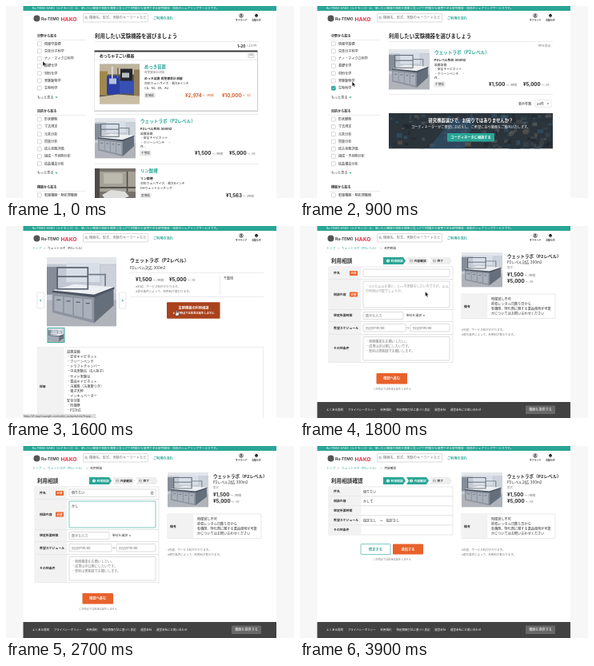
These frames come from a looping animation (360 px wide and 240 px high, 4000 ms). An HTML page with a canvas:

```html
<!DOCTYPE html>
<html lang="ja">
<head>
<meta charset="utf-8">
<style>
html, body { margin: 0; width: 100%; height: 100%; overflow: hidden; background: #fff; }
canvas { display: block; width: 360px; height: 240px; }
</style>
</head>
<body>
<canvas id="stage"></canvas>
<script>
const canvas = document.getElementById('stage');
const c = canvas.getContext('2d');
const ratio = window.devicePixelRatio || 1;
canvas.width = 360 * ratio;
canvas.height = 240 * ratio;
c.scale(ratio, ratio);

const TEAL = '#2aa596', ORANGE = '#e8622c', RED = '#d9602f', INK = '#2b2b2b', GREY = '#777', LINE = '#d9d9d9';
const WET_LAB = 'ウェットラボ（P2レベル）';
const NO_CHARGE = 'この時点では料金は発生しません';

// Draws text centred on y and returns its width; the large font scaled down avoids hinting.
function text(s, x, y, size = 4.3, color = INK, bold = false, align = 'left') {
  c.save();
  c.translate(x, y + size * .37);
  c.scale(.1, .1);
  c.font = `${bold ? 700 : 400} ${size * 10}px Inter, "Noto Sans CJK JP", "Noto Sans CJK", sans-serif`;
  c.fillStyle = color;
  c.textAlign = align;
  c.fillText(s, 0, 0);
  const width = c.measureText(s).width / 10;
  c.restore();
  return width;
}
function lines(list, x, y, step, size, color) {
  list.forEach((s, i) => text(s, x, y + i * step, size, color));
}
function rect(x, y, w, h, color) {
  c.fillStyle = color;
  c.fillRect(x, y, w, h);
}
function box(x, y, w, h, fill = '#fff', stroke = '#c4c4c4', radius = .8) {
  c.beginPath();
  c.roundRect(x, y, w, h, radius);
  c.fillStyle = fill;
  c.fill();
  if (stroke) {
    c.strokeStyle = stroke;
    c.lineWidth = .6;
    c.stroke();
  }
}
function poly(color, ...p) {
  c.beginPath();
  for (let i = 0; i < p.length; i += 2) c.lineTo(p[i], p[i + 1]);
  c.closePath();
  c.fillStyle = color;
  c.fill();
}
function disc(x, y, r, color) {
  c.beginPath();
  c.arc(x, y, r, 0, 7);
  c.fillStyle = color;
  c.fill();
}
function chevron(x, y, dx, dy, color = TEAL) {
  c.beginPath();
  c.moveTo(x - dx - dy, y - dy - dx);
  c.lineTo(x + dx, y + dy);
  c.lineTo(x - dx + dy, y - dy + dx);
  c.strokeStyle = color;
  c.lineWidth = .8;
  c.stroke();
}
function button(s, x, y, w, h, fill, color = '#fff', stroke = null) {
  box(x, y, w, h, fill, stroke, 1);
  text(s, x + w / 2, y + h / 2, 4.2, color, true, 'center');
}

// Photos are drawn in a 100 x 100 space and clipped to their box.
function photo(draw, x, y, w, h) {
  c.save();
  c.beginPath();
  c.rect(x, y, w, h);
  c.clip();
  c.translate(x, y);
  c.scale(w / 100, h / 100);
  draw();
  c.restore();
}
function labPhoto() {
  rect(0, 0, 100, 100, '#c3c9d3');
  rect(0, 0, 100, 10, '#e3e6ea');
  rect(28, 8, 48, 28, '#d9dfe8');
  rect(0, 14, 16, 40, '#858d99');
  rect(78, 12, 22, 40, '#cdd2da');
  rect(0, 62, 100, 38, '#b0b3b9');
  poly('#8d94a0', 8, 51, 68, 56, 68, 95, 8, 80);
  poly('#656e7b', 68, 56, 96, 46, 96, 70, 68, 95);
  poly('#eef0f3', 8, 48, 40, 39, 97, 43, 68, 54);
  poly('#4b5460', 8, 48, 68, 54, 97, 43, 97, 46, 68, 58, 8, 51);
  for (let i = 0; i < 4; i++) {
    const x = 11 + i * 14;
    poly('#aab0ba', x, 56 + i * 1.4, x + 12, 57 + i * 1.4, x + 12, 80 + i * 3.4, x, 77 + i * 3.4);
    rect(x + 3, 61 + i * 1.6, 6, 1.5, '#59626e');
  }
  c.strokeStyle = '#596370';
  c.lineWidth = 2;
  c.strokeRect(15, 15, 44, 31);
  rect(15, 27, 44, 2, '#596370');
  rect(60, 24, 24, 2, '#737d89');
  rect(83, 24, 2, 18, '#737d89');
}
function platingPhoto() {
  rect(0, 0, 100, 100, '#595650');
  rect(0, 0, 100, 26, '#beb49d');
  rect(0, 18, 20, 60, '#a1884c');
  rect(52, 12, 30, 45, '#25262d');
  rect(18, 30, 32, 46, '#2b3da6');
  rect(24, 36, 18, 14, '#b5c1e0');
  rect(50, 42, 34, 32, '#3750b4');
  rect(56, 22, 18, 12, '#b8bdc4');
  rect(86, 14, 14, 66, '#8f7c5b');
  poly('#c9bea4', 0, 82, 45, 76, 100, 80, 100, 100, 0, 100);
  rect(30, 6, 3, 30, '#e6e4dd');
  rect(44, 10, 3, 24, '#6e685d');
}
function tankPhoto() {
  rect(0, 0, 100, 100, '#a5a196');
  rect(0, 0, 12, 100, '#4d4a47');
  rect(12, 0, 88, 8, '#77736b');
  rect(22, 12, 46, 26, '#bcb9af');
  rect(12, 46, 88, 4, '#55524e');
  rect(12, 58, 88, 42, '#77736c');
  poly('#dedfdc', 18, 66, 40, 54, 74, 58, 84, 70, 56, 80, 26, 78);
  rect(78, 8, 3, 50, '#4d4a47');
}
function bannerPhoto() {
  rect(0, 0, 100, 100, '#2b333b');
  let seed = 7;
  const random = () => (seed = seed * 16807 % 2147483647) / 2147483647;
  const tones = ['#3d4d57', '#4d5556', '#26343f', '#655b52', '#365e74', '#1f242a'];
  for (let i = 0; i < 160; i++) {
    c.globalAlpha = .55;
    rect(random() * 100, random() * 100, 1 + random() * 3, 4 + random() * 10, tones[i % 6]);
  }
  c.globalAlpha = 1;
  poly('#31567499', 24, 100, 38, 20, 53, 10, 46, 100);
}

function background() {
  rect(0, 0, 360, 240, '#f7f7f7');
  rect(21.5, 0, 316.5, 240, '#fff');
}
function header() {
  rect(21.5, 0, 316.5, 6, TEAL);
  text('Ru-TEMO HAKO（ルテモハコ）は、使いたい機器や技術を簡単に見つけて1時間から使用できる研究機器・技術のシェアリングサービスです。',
    33, 3, 3.65, '#fff');
  disc(38.5, 15.5, 4, '#555');
  text('Ru-TEMO', 44, 16, 4.9, '#444', true);
  text('HAKO', 68.5, 16, 6.8, '#e0384a', true);
  box(96.5, 9.5, 81, 10.5);
  c.beginPath();
  c.arc(100, 14.3, 1.2, 0, 7);
  c.moveTo(101, 15.3);
  c.lineTo(102.2, 16.6);
  c.strokeStyle = GREY;
  c.stroke();
  text('機器名、型式、実験のキーワードなど', 104, 14.8, 4.2, GREY);
  text('ご利用の流れ', 184, 15.3, 4.1, TEAL, true);
  c.beginPath();
  c.arc(294, 12, 2.4, 0, 7);
  c.strokeStyle = INK;
  c.stroke();
  disc(294, 11.3, 1, INK);
  rect(292.5, 12.6, 3, 1, INK);
  disc(313, 11.3, 1.6, INK);
  rect(311.2, 11.3, 3.6, 2, INK);
  disc(313, 13.7, .7, INK);
  text('マイページ', 294, 18, 2.9, INK, true, 'center');
  text('お知らせ', 313, 18, 2.9, INK, true, 'center');
}
function breadcrumb(...last) {
  const path = ['トップ', WET_LAB, ...last];
  let x = 33;
  path.forEach((s, i) => {
    const end = i === path.length - 1;
    x += text(s, x, 27.5, 3.7, end ? INK : TEAL) + 2.5;
    if (!end) text('＞', x, 27.5, 3, GREY);
    x += 5.5;
  });
}
function status(s) {
  rect(21.5, 235, 91, 5, '#dedede');
  text(s, 22, 237.5, 3.2, '#444');
}
function footer() {
  rect(21.5, 220, 316.5, 20, '#424242');
  let x = 33;
  for (const s of ['よくある質問', 'プライバシーポリシー', '利用規約', '特定商取引法に基づく表記', '運営会社', '運営会社にお問い合わせ']) {
    x += text(s, x, 230, 3.5, '#fff') + 5.8;
  }
  box(282, 224.5, 37, 10.5, '#686868', null);
  text('機器を提供する', 300.5, 229.8, 4.1, '#fff', false, 'center');
}

function filterGroup(title, y, items, checked) {
  text(title, 39, y, 4.1, INK, true);
  rect(36, y + 5, 64, .5, LINE);
  items.forEach((s, i) => {
    const cy = y + 10.2 + i * 9.25, on = i === checked;
    box(39.3, cy - 2.5, 5, 5, on ? TEAL : '#fff', on ? TEAL : '#bbb');
    if (on) {
      c.beginPath();
      c.moveTo(40.4, cy);
      c.lineTo(41.5, cy + 1.2);
      c.lineTo(43.3, cy - 1.2);
      c.strokeStyle = '#fff';
      c.stroke();
    }
    text(s, 48, cy, 4.1);
  });
  text('もっと見る', 39, y + 77, 4.1);
  chevron(63, y + 77, 0, 1);
}
function sidebar(checked) {
  filterGroup('分野から絞る', 37, ['情報学基礎', '生体分子科学', 'ナノ・マイクロ科学', '基礎化学', '材料化学', '実験動物学', '生物科学'], checked);
  filterGroup('目的から絞る', 131.5, ['形状観察', '寸法測定', '元素分析', '質量分析', '結合状態評価', '組成・不純物分析', '結晶構造分析'], -1);
  filterGroup('機器から絞る', 226, ['乾燥機器・熱処理機器'], -1);
  text('利用したい実験機器を選びましょう', 111, 38, 6.45, INK, true);
  rect(111, 44.5, 205, .5, LINE);
}
function price(x, y, amount, unit, color = INK) {
  const width = text('¥' + amount, x, y, 6.2, color, true);
  text('～ /' + unit, x + width + 1, y + .4, 3.8, color === INK ? GREY : color);
}
function tag(s, x, y) {
  box(x, y, 13, 6, '#eee', '#ddd', .5);
  text(s, x + 6.5, y + 3, 3.6, INK, false, 'center');
}
function wetLabItem(y, hover) {
  photo(labPhoto, 111, y, 51, 50.5);
  text(WET_LAB, 168, y + 4, 5.6, TEAL, true);
  if (hover) rect(168, y + 7, 64, .6, TEAL);
  text('P2レベル対応 300m2', 168, y + 13.5, 3.9, INK, true);
  lines(['設置設備', '・安全キャビネット', '・クリーンベンチ　・', '在…'], 168, y + 19.7, 5.2, 3.8);
  tag('千葉県', 168, y + 41);
  price(236, y + 44, '1,500', '時間');
  price(279, y + 44, '5,000', '日');
}
function listPage() {
  sidebar(-1);
  text('1–20', 289, 50, 4.6, INK, true);
  text('/ 227件', 313.5, 50, 3.7, GREY, false, 'right');
  rect(110.5, 57, 204.5, 75, '#cfcfcf');
  rect(111, 57, 203, 73.5, '#fff');
  rect(110.5, 55.5, 204, 2, '#383838');
  text('めっちゃすごい機器', 117, 62, 4.8, INK, true);
  box(303, 59.6, 7, 5, '#fff', '#aaa');
  text('PR', 306.5, 62.2, 3.2, GREY, false, 'center');
  rect(111, 67, 203, .5, LINE);
  photo(platingPhoto, 117, 72.5, 50, 50);
  text('めっき装置', 173, 75.8, 5.4, TEAL, true);
  text('青葉鍍金計測器', 173, 82.3, 3.6, GREY);
  text('めっき装置 青葉鍍金計測器', 173, 90.3, 3.9, INK, true);
  lines(['対応ウェハサイズ：最大6インチ', 'Cu、Ni、Sn、Au'], 173, 97, 5.2, 3.8);
  tag('宮城県', 173, 108.5);
  price(224, 111.5, '2,974', '時間', RED);
  price(270, 111.5, '10,000', '日', RED);
  rect(111, 135, 205, .5, LINE);
  wetLabItem(140, false);
  rect(111, 197, 205, .5, LINE);
  photo(tankPhoto, 111, 203, 51, 50);
  text('リン酸槽', 168, 206.5, 5.4, TEAL, true);
  text('リン酸槽', 168, 216, 3.9, INK, true);
  lines(['対応ウェハサイズ：最大6インチ', 'DHウェットエッチング'], 168, 222, 5.2, 3.8);
  tag('宮城県', 168, 234);
  price(275, 237, '1,563', '時間');
}
function resultPage(hover) {
  sidebar(6);
  text('1件を表示', 313.5, 50, 3.7, GREY, false, 'right');
  wetLabItem(54, hover);
  rect(111, 110.5, 205, .5, LINE);
  text('表示件数', 273, 122, 4.1);
  box(294, 117.5, 20, 9, '#fff', '#ddd');
  text('20件', 296, 122, 4.1);
  chevron(310, 122, 0, .8, GREY);
  photo(bannerPhoto, 111, 134, 205, 44.5);
  text('研究機器選びで、お困りではありませんか？', 213.5, 143, 5.3, '#fff', true, 'center');
  text('コーディネーターがご要望にお応えし、ご希望に合う機器をご案内いたします。', 213.5, 151, 4.15, '#fff', false, 'center');
  button('コーディネータに相談する', 184, 159, 59, 10.5, TEAL);
  if (hover) status('https://r1.stapl.example.com/equipment/1234');
}
function detailPage(hover) {
  breadcrumb();
  photo(labPhoto, 51, 39, 87, 86.5);
  for (const [x, dir] of [[39, -1], [141.5, 1]]) {
    box(x, 83, 8.5, 20, '#fff', LINE);
    chevron(x + 4.2, 93, dir, 0);
  }
  photo(labPhoto, 52, 127.5, 21, 18);
  c.strokeStyle = TEAL;
  c.lineWidth = .9;
  c.strokeRect(52, 127.5, 21, 18);
  text(WET_LAB, 155, 43.2, 6, INK, true);
  text('P2レベル対応 300m2', 155, 52, 4.5);
  rect(155, 58, 167, .5, LINE);
  price(162, 67, '1,500', '時間');
  price(204, 67, '5,000', '日');
  lines(['※別途、サービス料がかかります。', '※貸主条件によって、利用料が変わります。'], 162, 75.5, 6, 3.6, GREY);
  rect(267, 61, .5, 25, LINE);
  text('千葉県', 272, 65.3, 4.1);
  rect(155, 88, 167, .5, LINE);
  box(201, 95.3, 66.5, 20.5, hover ? '#a9421c' : ORANGE, null, 1);
  text('実験機器の利用相談', 234.5, 102, 4.2, '#fff', true, 'center');
  text('※' + NO_CHARGE, 234.5, 108.8, 3.3, '#fff', true, 'center');
  rect(39, 151, 283, 89, LINE);
  rect(39.5, 151.5, 282, 89, '#fff');
  rect(39.5, 151.5, 33, 89, '#f2f2f2');
  text('詳細', 42, 200.5, 3.7, INK, true);
  lines(['設置設備', '・安全キャビネット', '・クリーンベンチ', '・ドラフトチャンバー', '・中央実験台（6人掛子）', '・サイド実験台', '・薬品キャビネット',
    '・冷蔵庫（冷凍庫つき）', '・電子天秤', '・インキュベーター', '安全対策', '・防爆壁', '・P2対応'], 76, 157.3, 6.13, 4.2);
  if (hover) status('https://r1.stapl.example.com/order_contacts/new?equip…');
}

function summary() {
  photo(labPhoto, 202, 33, 51, 43.5);
  text(WET_LAB, 259, 38, 5.5, INK, true);
  text('P2レベル対応 300m2', 259, 45.5, 4.4);
  text('型式：', 259, 51.5, 3.5, GREY);
  price(259, 60.8, '1,500', '時間');
  price(259, 68.8, '5,000', '日');
  box(202, 85, 117, 30.5, '#fff', LINE, 0);
  rect(202.3, 85.3, 32, 30, '#f2f2f2');
  text('備考', 205, 100.5, 3.9, INK, true);
  lines(['時間貸し不可', '最低レンタル日数５日から', '有機剤、特化剤に関する薬品使用が可能', 'かについてはお問い合わせください'], 239, 91, 6.1, 4.15);
  lines(['※別途、サービス料がかかります。', '※取引条件によって、利用料が変わります。'], 202, 130, 6, 3.5, GREY);
}
function steps(current) {
  ['利用相談', '内容確認', '完了'].forEach((s, i) => {
    const x = [104, 133, 162][i], on = i < current, end = x + 25;
    poly(on ? TEAL : '#eee', x, 39, end, 39, end + 3, 43.5, end, 48, x, 48, x + (i ? 3 : 0), 43.5);
    disc(x + 6, 43.5, 2, on ? '#fff' : '#aaa');
    text(i + 1, x + 6, 43.6, 3, on ? TEAL : '#fff', true, 'center');
    text(s, x + 9.5, 43.6, 3.8, on ? '#fff' : INK, true);
  });
}
function table(labels, edges) {
  labels.forEach((s, i) => {
    const y = edges[i], h = edges[i + 1] - y;
    box(36, y, 155, h, '#fff', LINE, 0);
    rect(36.3, y + .3, 40, h - .6, '#f2f2f2');
    text(s, 42, y + h / 2, 3.9, INK, true);
  });
}
function formPage(title, step) {
  breadcrumb(step > 1 ? '内容確認' : '利用相談');
  text(title, 39, 43.5, 6.6, INK, true);
  steps(step);
  summary();
  footer();
}
function inputPage(t) {
  formPage('利用相談', 1);
  table(['件名', '相談内容', '想定所要時間', '希望スケジュール', 'その他条件'], [51, 66.5, 104.5, 119.5, 135.5, 170.5]);
  for (const y of [59, 85.5]) {
    box(62, y - 3, 10, 6, ORANGE, null);
    text('必須', 67, y, 3.4, '#fff', true, 'center');
  }
  box(79, 54, 108, 9.5, '#fff', t >= 1900 && t < 2500 ? TEAL : undefined);
  box(79, 69, 108, 33, '#fff', t >= 2500 && t < 3000 ? TEAL : undefined);
  box(79, 107.5, 50, 9);
  text('数字を入力', 82, 112, 4.1, GREY);
  text('単位を選択', 133, 112, 3.8);
  chevron(155, 112, 0, .8, GREY);
  box(79, 122.5, 53, 9.5);
  box(138, 122.5, 49, 9.5);
  text('～', 135, 127.2, 4, INK, false, 'center');
  for (const x of [82, 141]) text('yyyy/mm/dd', x, 127.2, 4, GREY);
  box(79, 138.5, 108, 29.5);
  lines(['・発酵機能をお願いしたい。', '・成果は非公開にしたいです。', '・契約は要相談でお願いします。'], 82, 144, 6.2, 4.1, GREY);

  const subject = t < 2000 ? '' : t < 2100 ? 'k' : t < 2200 ? 'か' : t < 2300 ? 'かr' : t < 2400 ? 'かり' : '借りたい';
  const width = text(subject, 82, 58.8, 4.1);
  if (t >= 1900 && t < 2500) rect(82.5 + width, 56, .5, 5.5, INK);
  if (t >= 2000 && t < 2400) rect(82, 61.5, width, .5, INK);
  const body = t < 2600 ? '' : 'かして'.slice(0, Math.floor((t - 2500) / 100));
  if (body) text(body, 82, 75.5, 4.1);
  else lines(['・○○と△△を使い、C++の実験をしたいのですが、△△', 'の利用は可能でしょうか。'], 82, 75.5, 6.2, 4, '#999');
  if (t >= 2400) {
    box(181, 56.8, 3.2, 4, '#999', null);
    rect(182, 58, 1.2, 1.6, '#fff');
  }
  if (t >= 2100 && t < 2400) {
    box(80, 62, 35, 22, '#fff', '#888');
    rect(80.3, 78.3, 34.4, 5.4, '#e8e8e8');
    lines(['借りたい', '借りたいかして', '借り', 'Tabキーで選択'], 82, 65, 5.4, 4);
  }
  button('確認へ進む', 95.5, 184, 38.5, 13.5, t >= 3100 ? '#eda27f' : ORANGE);
  text(NO_CHARGE, 115, 203.5, 3.2, GREY, false, 'center');
}
function confirmPage() {
  formPage('利用相談確認', 2);
  table(['件名', '相談内容', '想定所要時間', '希望スケジュール', 'その他条件'], [51, 63, 75, 87, 99, 111]);
  lines(['借りたい', 'かして', '', '指定なし　～　指定なし'], 79, 57, 12, 4.1);
  button('修正する', 76, 122.5, 37, 13, '#fff', TEAL, TEAL);
  button('送信する', 116, 122.5, 38, 13, ORANGE);
  text(NO_CHARGE, 115, 141.5, 3.2, GREY, false, 'center');
}

const route = [[0, 46, 69], [100, 46, 69], [600, 40, 101], [800, 40, 101], [1200, 201, 59], [1300, 201, 59],
  [1600, 213, 106], [1700, 213, 106], [1900, 100, 58], [2900, 100, 85], [3200, 126, 189], [3500, 126, 189]];
function pointer(t) {
  if (t >= 3500 || (t >= 1900 && t < 2900)) return;
  const i = route.findIndex(p => p[0] > t);
  const [t0, x0, y0] = route[i - 1], [t1, x1, y1] = route[i];
  const k = (t - t0) / (t1 - t0), ease = k * k * (3 - 2 * k);
  c.save();
  c.translate(x0 + (x1 - x0) * ease, y0 + (y1 - y0) * ease);
  if (t >= 1200 && t < 1300 || t >= 1600 && t < 1800) {
    box(-1.4, 2.2, 4.4, 4, '#fff', '#222', 1.2);
    box(-.4, -.4, 1.3, 4.5, '#fff', '#222', .6);
    rect(-.1, 2.5, 2.6, 2.6, '#fff');
  } else {
    poly('#111', 0, 0, 0, 6, 1.4, 4.8, 2.4, 6.9, 3.4, 6.4, 2.5, 4.4, 4.3, 4.3);
    c.strokeStyle = '#fff';
    c.lineWidth = .4;
    c.stroke();
  }
  c.restore();
}

function draw() {
  const t = Math.floor(performance.now() % 4000 / 100) * 100;
  background();
  if (t < 900) listPage();
  else if (t < 1400) resultPage(t >= 1200);
  else if (t < 1800) detailPage(t >= 1600);
  else if (t < 3500) inputPage(t);
  else confirmPage();
  header();
  pointer(t);
  requestAnimationFrame(draw);
}
draw();
</script>
</body>
</html>
```
